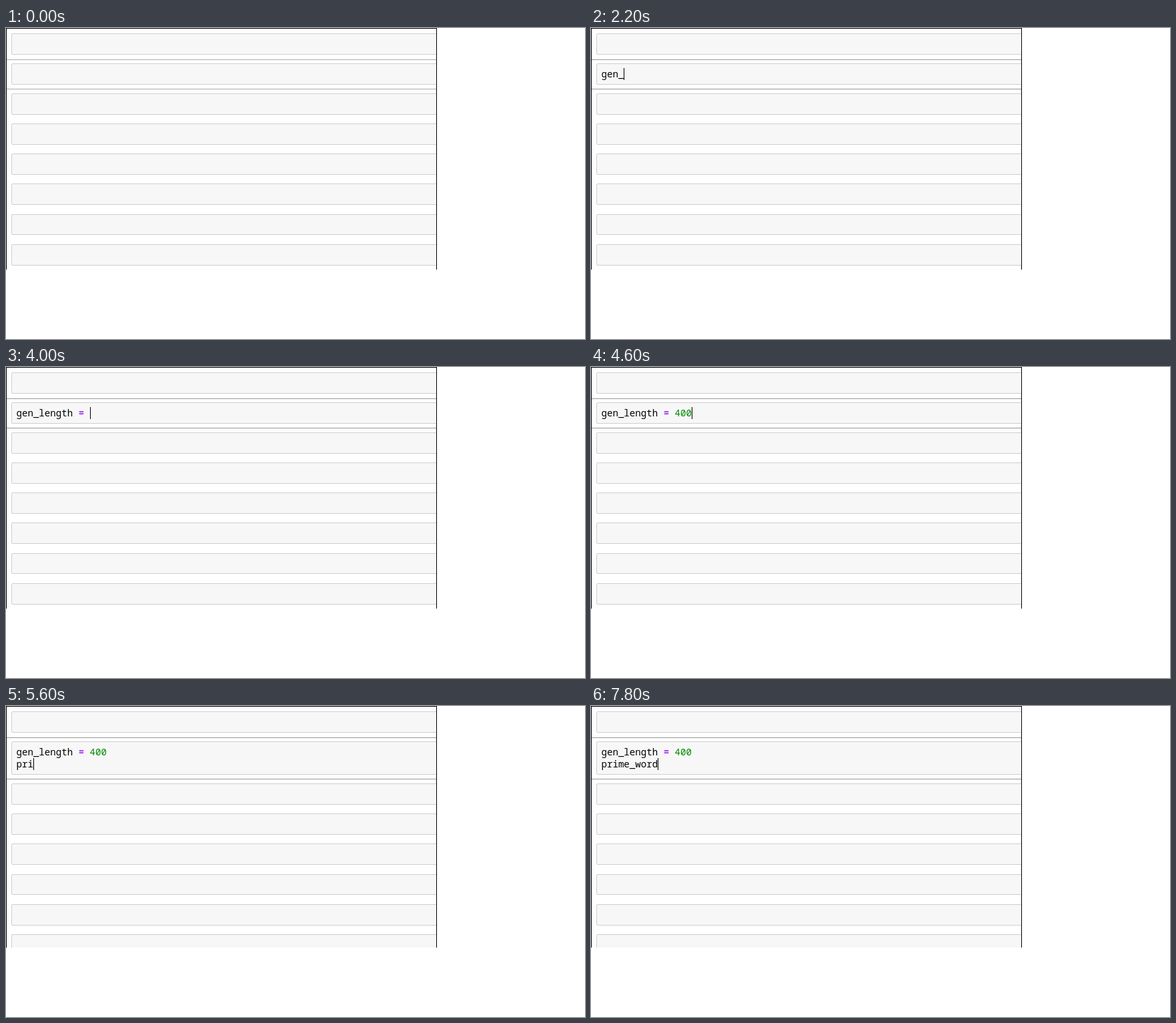
An HTML page that plays this animation: 868x466 px, repeating every 8 s.

```html
<!DOCTYPE html>
<html lang="en">
<head>
<meta charset="utf-8">
<title>Notebook typing</title>
<style>
  html, body { margin: 0; width: 100%; height: 100%; overflow: hidden; background: #fff; }
  svg { display: block; }
  text { font: 14.11px "Noto Sans Mono", "DejaVu Sans Mono", monospace; white-space: pre; }
  .cell { fill: #f7f7f7; stroke: #cfcfcf; }
  .operator { fill: #a2f; font-weight: bold; }
  .number { fill: #080; }
</style>
</head>
<body>
<svg id="stage" width="868" height="466" viewBox="0 0 868 466"></svg>
<script>
const LOOP = 8000;
const LEFT = 15.5, ADVANCE = 8.467, LINE_TOP = 60, LINE_HEIGHT = 18;
const CELL = { top: 8.3, pitch: 45.13, height: 31.85, growth: 18.1, count: 8 };

const LINES = [
  [['gen_length '], ['=', 'operator'], [' 400', 'number']],
  [['prime_word']]
];

// time, line, typed characters, caret visible
const STEPS = [
  [0, 0, 0, false], [800, 0, 0, true], [1000, 0, 1, true], [1500, 0, 1, false],
  [1700, 0, 3, true], [2200, 0, 4, true], [2500, 0, 5, true], [2600, 0, 6, true],
  [2800, 0, 7, true], [3000, 0, 8, true], [3300, 0, 10, true], [3700, 0, 11, true],
  [3800, 0, 12, true], [4000, 0, 13, true], [4200, 0, 14, true], [4400, 0, 15, true],
  [4600, 0, 16, true], [4900, 1, 0, true], [5300, 1, 1, true], [5500, 1, 2, true],
  [5600, 1, 3, true], [5700, 1, 4, true], [5800, 1, 5, true], [6300, 1, 5, false],
  [6400, 1, 6, true], [6900, 1, 7, true], [7400, 1, 8, true], [7600, 1, 9, true],
  [7800, 1, 10, true]
];

const stage = document.getElementById('stage');
const rect = (x, y, w, h, fill) =>
  `<rect x="${x}" y="${y}" width="${w}" height="${h}" fill="${fill}"/>`;

function cells(growth) {
  let out = '';
  for (let i = 0; i < CELL.count; i++) {
    const start = CELL.top + i * CELL.pitch;
    const top = Math.floor(start + (i > 1 ? growth : 0));
    const bottom = Math.floor(start + CELL.height + (i > 0 ? growth : 0));
    out += `<rect class="cell" x="8.5" y="${top + .5}" width="700" height="${bottom - top - 1}" rx="1.5"/>`;
  }
  return out;
}

function codeLine(index, typed) {
  let left = typed;
  const spans = LINES[index].map(([text, kind = '']) => {
    const part = text.slice(0, Math.max(0, left));
    left -= text.length;
    return `<tspan class="${kind}">${part}</tspan>`;
  });
  return `<text x="${LEFT}" y="${74 + index * LINE_HEIGHT}">${spans.join('')}</text>`;
}

function caret(line, typed) {
  const x = typed ? Math.round(LEFT + typed * ADVANCE) : 15;
  return rect(x, LINE_TOP + line * LINE_HEIGHT, typed ? 1 : 2, LINE_HEIGHT, '#000');
}

function draw([time, line, typed, caretOn]) {
  const edge = time < 800 ? '#ababab' : '#959995';
  let code = '';
  for (let i = 0; i <= line; i++) code += codeLine(i, i < line ? Infinity : typed);
  stage.innerHTML =
    `<clipPath id="panel">${rect(0, 0, 645, 362, '#000')}</clipPath>` +
    `<g clip-path="url(#panel)">${cells(line * CELL.growth)}</g>` +
    rect(1, 47, 644, 1, edge) + rect(1, 91 + line * LINE_HEIGHT, 644, 1, edge) +
    rect(0, 0, 646, 1, '#000') + rect(0, 0, 1, 362, '#000') + rect(645, 0, 1, 362, '#000') +
    code + (caretOn ? caret(line, typed) : '');
}

let shown;
function tick() {
  const time = performance.now() % LOOP;
  const step = STEPS.findLast(([start]) => start <= time);
  if (step !== shown) draw(shown = step);
  requestAnimationFrame(tick);
}
tick();
</script>
</body>
</html>
```
